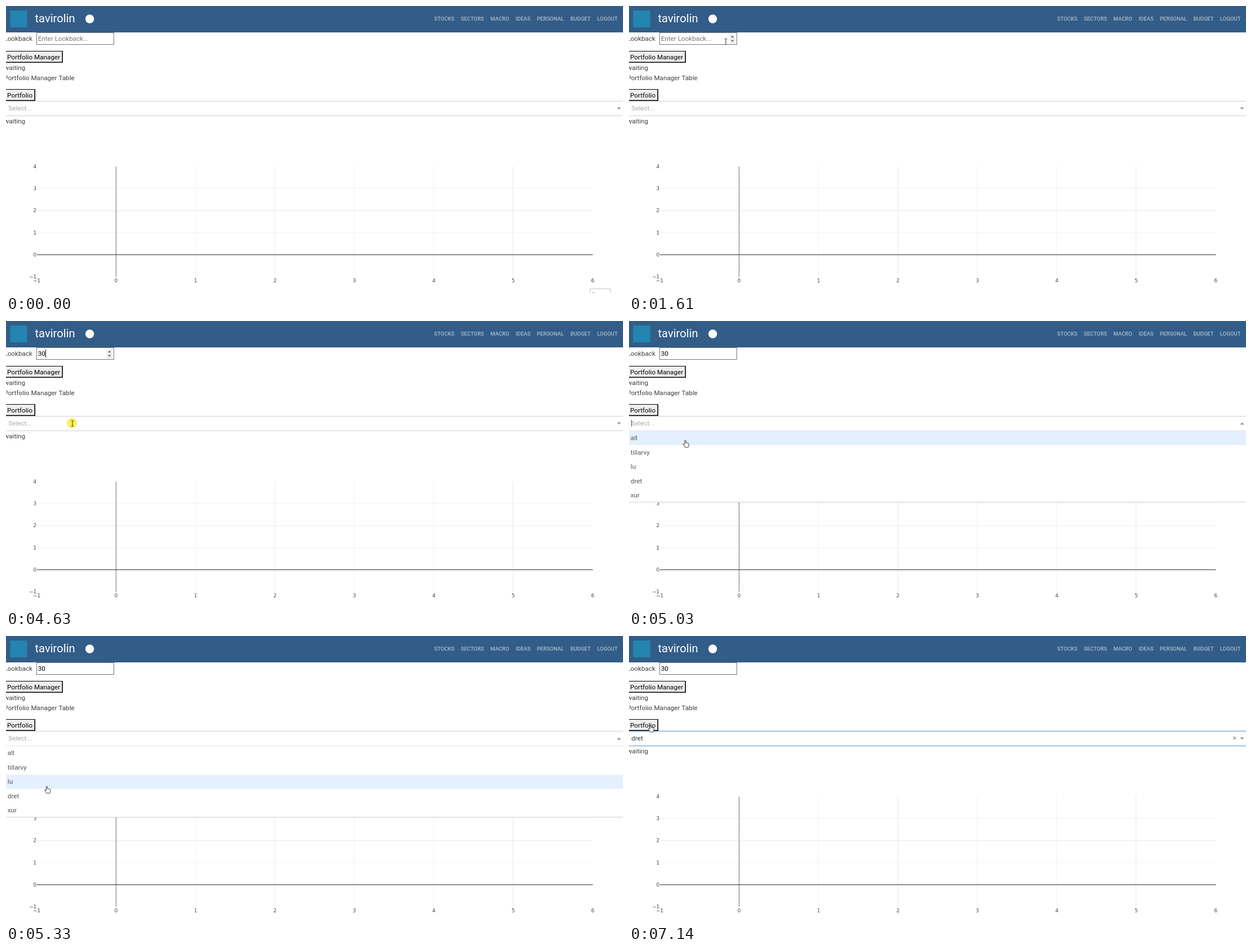
An HTML page with a canvas for the animation above (8 s loop, 1096x511 px).

```html
<!DOCTYPE html>
<html lang="en">
<head>
<meta charset="utf-8">
<title>Portfolio dashboard</title>
<style>
  html, body { margin: 0; width: 100%; height: 100%; overflow: hidden; background: #fff; }
  canvas { display: block; }
</style>
</head>
<body>
<canvas id="stage" width="1096" height="511"></canvas>
<script>
const ctx = document.getElementById('stage').getContext('2d');
const W = 1096, H = 511, LOOP = 8000;
const UI = 'Roboto, sans-serif';
const CHART = '"DejaVu Sans", Verdana, sans-serif';
const INK = '#3e3f3a';
const OPTIONS = ['all', 'tillarvy', 'lu', 'dret', 'xur'];
const ROW = 25.5, MENU_TOP = 195.5;

const T = {
  tip: 100, focus: 1710, key1: 3220, key2: 3330,
  open: 4730, pick: 5550, clear: 5750
};

// Pointer moves: start, end, steps, target x, target y
const MOVES = [
  [390, 390, 1, 880, 348],
  [490, 490, 1, 767, 348],
  [580, 680, 2, 605, 220],
  [880, 980, 2, 392, 129],
  [1090, 1610, 6, 172, 63],
  [2010, 2310, 4, 198, 103],
  [3930, 4330, 5, 128, 184],
  [4430, 4430, 1, 120, 190],
  [4530, 4530, 1, 118, 182],
  [5030, 5030, 1, 100, 212],
  [5130, 5130, 1, 75, 258],
  [5230, 5340, 2, 70, 276],
  [5850, 6250, 5, 43, 150],
  [6550, 6750, 3, 39, 158],
  [6940, 6940, 1, 38.5, 158],
  [7140, 7140, 1, 38, 158]
];
const CLICKS = [[1710, 1810], [4630, 4730], [5440, 5550]];

const within = (t, a, b) => t >= a && t < b;
const inBox = (p, x0, y0, x1, y1) => p.x >= x0 && p.x <= x1 && p.y >= y0 && p.y <= y1;
const easeOut = p => 1 - (1 - p) ** 2;

function rect(x, y, w, h, color) {
  ctx.fillStyle = color;
  ctx.fillRect(x, y, w, h);
}

function text(str, x, y, color = INK, font = '11.7px ' + UI, align = 'left') {
  ctx.font = font;
  ctx.fillStyle = color;
  ctx.textAlign = align;
  ctx.fillText(str, x, y);
}

function shape(points, color) {
  ctx.beginPath();
  points.forEach(([x, y]) => ctx.lineTo(x, y));
  ctx.closePath();
  ctx.fillStyle = color;
  ctx.fill();
}

function disc(x, y, r, color) {
  ctx.beginPath();
  ctx.arc(x, y, r, 0, Math.PI * 2);
  ctx.fillStyle = color;
  ctx.fill();
}

// Triangle pointing down (dir 1) or up (dir -1)
function wedge(x, y, r, dir, color) {
  const h = r * 0.55 * dir;
  shape([[x - r, y - h], [x + r, y - h], [x, y + h]], color);
}

function pointerAt(t) {
  if (t < MOVES[0][0]) return null;
  let p = { x: 960, y: 348 };
  for (const [t0, t1, n, x, y] of MOVES) {
    if (t < t0) break;
    const gap = n > 1 ? (t1 - t0) / (n - 1) : 1;
    const k = Math.min(n, Math.floor((t - t0) / gap + 0.01) + 1);
    const e = n > 4 ? easeOut(k / n) : k / n;
    p = { x: p.x + (x - p.x) * e, y: p.y + (y - p.y) * e };
  }
  return p;
}

const overInput = p => p && inBox(p, 54, 47, 192, 69);

function pointerKind(p, open) {
  if (open && p.y > MENU_TOP) return 'hand';
  if (overInput(p) || inBox(p, 0, 169, 1065, 195)) return 'beam';
  if (inBox(p, 0, 148, 52, 169) || inBox(p, 0, 80, 101, 101)) return 'hand';
  if (inBox(p, 55, 286, 1042, 482)) return 'cross';
  return 'arrow';
}

function outlined(path) {
  ctx.fillStyle = '#fff';
  ctx.strokeStyle = '#222';
  ctx.lineWidth = 0.9;
  ctx.lineJoin = 'round';
  const p = new Path2D(path);
  ctx.fill(p);
  ctx.stroke(p);
}

function drawPointer(p, kind) {
  ctx.save();
  ctx.translate(p.x, p.y);
  if (kind === 'arrow') {
    outlined('M.5 .5V9.6L2.6 7.7L4 11L5.5 10.4L4.1 7.2H7Z');
  } else if (kind === 'hand') {
    outlined('M-1 8V1Q0-.6 1 1V5Q2 4 3 5.3Q4 4.6 4.7 5.8Q5.8 5.2 6.2 6.6V9.5' +
      'Q6 11.5 5 13H-.2Q-1.5 11-3.8 8.2Q-4 6.6-2.6 7Z');
  } else if (kind === 'beam') {
    rect(-0.5, -4.5, 1, 10, '#333');
    rect(-2.5, -5, 5, 1, '#555');
    rect(-2.5, 5, 5, 1, '#555');
  } else {
    rect(-7, -0.5, 14, 1, '#333');
    rect(-0.5, -7, 1, 14, '#333');
  }
  ctx.restore();
}

function drawNav() {
  rect(0, 0, W, 47, '#325d88');
  rect(7.5, 8, 30, 30, '#2385b0');
  text('tavirolin', 51.5, 29, '#fff', '20.2px ' + UI);
  disc(148.7, 23, 7.7, '#fff');
  const links = { STOCKS: 760.5, SECTORS: 808, MACRO: 860.5, IDEAS: 905.3,
    PERSONAL: 943, BUDGET: 1002.5, LOGOUT: 1050 };
  for (const name in links) {
    text(name, links[name], 25.6, '#a9bacb', '500 9.5px ' + UI);
  }
}

function drawButton(label, y, right) {
  rect(-4, y, right + 4, 21, '#000');
  rect(-4, y + 1, right + 2.4, 18.5, '#efefef');
  text(label, 2, y + 14.6, '#000');
}

function drawInput(t, p) {
  text('Lookback', -3.6, 62);
  rect(54, 47, 138, 22, '#767676');
  rect(55, 48, 136, 20, '#fff');
  const typed = t < T.key1 ? '' : t < T.key2 ? '3' : '30';
  text(typed || 'Enter Lookback...', 56.7, 62, typed ? '#000' : '#757575');
  const focused = within(t, T.focus, T.open);
  if (focused || overInput(p)) {
    rect(178.5, 49.5, 10.5, 17.5, '#efefef');
    wedge(183.7, 54.3, 2.5, -1, '#444');
    wedge(183.7, 62, 2.5, 1, '#444');
  }
  const blink = within(t, 2210, 2800) || within(t, 3830, 4330);
  if (focused && !blink) {
    rect(57 + typed.length * 6.5, 51, 1, 14, '#000');
  }
}

function drawChart() {
  const gx = i => Math.round(195.6 + i * 141.1) - 0.5;
  const gy = i => 442.7 - i * 39.3;
  const font = '8.8px ' + CHART;
  const label = n => String(n).replace('-', '\u2212');
  for (let i = 1; i < 6; i++) {
    rect(Math.floor(gx(i)), 286, 1, 196, i === 2 || i === 5 ? '#e9e9e9' : '#f2f2f2');
  }
  for (let i = 1; i < 4; i++) {
    rect(55, Math.floor(gy(i)), 987, 1, i === 2 ? '#e9e9e9' : '#f2f2f2');
  }
  rect(195, 286, 1, 196, '#707070');
  rect(55, 442.2, 987.5, 1.2, '#444');
  for (let i = -1; i < 5; i++) text(label(i), 54.2, gy(i) + 3.3, '#444', font, 'right');
  for (let i = -1; i < 7; i++) text(label(i), 195.6 + i * 141.1, 492, '#444', font, 'center');
}

function drawToolbar(alpha) {
  ctx.save();
  ctx.globalAlpha = alpha;
  for (const x of [952, 973, 991, 1014, 1032, 1050, 1068]) {
    ctx.strokeStyle = '#444';
    ctx.lineWidth = 2;
    ctx.strokeRect(x - 3.5, 223, 7, 6);
  }
  rect(1085, 221, 11, 10, '#444');
  ctx.restore();
}

function drawSelect(t) {
  const open = within(t, T.open, T.pick), picked = t >= T.pick;
  if (picked) rect(0, 167, W, 31, '#e9f3fe');
  const edge = picked ? '#6ba0d4' : '#cfcfcf';
  rect(0, 169, W, 27, '#fff');
  rect(0, 169, W, 1, edge);
  rect(0, 195, W, 1, open ? '#e6e6e6' : edge);
  text(picked ? OPTIONS[3] : 'Select...', 4.3, 186.3, picked ? '#333' : '#aaa');
  wedge(1089, 182.6, 3.6, open ? -1 : 1, '#999');
  if (t >= T.clear) text('\u00d7', 1075.7, 186.4, '#888', '13px ' + UI, 'center');
  if (within(t, T.open, 5230)) rect(4, 176, 1, 12, '#555');
}

function drawMenu(t) {
  const active = t < 5130 ? 0 : t < 5230 ? 1 : t < 5340 ? 2 : 3;
  rect(0, 196, W, 127, '#fff');
  OPTIONS.forEach((name, i) => {
    const y = MENU_TOP + i * ROW;
    if (i === active) rect(0, Math.round(y), W, 25, '#e4f0fd');
    text(name, 2.8, y + 16.6, '#555');
  });
  rect(0, 322, W, 1, '#cfcfcf');
}

function toolbarAlpha(t) {
  if (within(t, 390, 880)) return t < 490 ? 0.1 : t < 580 ? 0.2 : 0.3;
  if (within(t, T.pick, 5850)) return t < 5650 ? 0.03 : t < T.clear ? 0.08 : 0.25;
  return 0;
}

function draw(t) {
  const p = pointerAt(t), open = within(t, T.open, T.pick);
  rect(0, 0, W, H, '#fff');
  drawNav();
  drawInput(t, p);
  drawButton('Portfolio Manager', 80, 101);
  text('waiting', -3.6, 114);
  text('Portfolio Manager Table', -3.6, 131.6);
  drawChart();
  drawToolbar(toolbarAlpha(t));
  drawSelect(t);
  drawButton('Portfolio', 148, 52);
  text('waiting', -3.6, 208.5);
  if (t < T.tip) {
    ctx.strokeStyle = '#c8c8c8';
    ctx.lineWidth = 1;
    ctx.strokeRect(1037.5, 503.5, 36, 20);
    text('Export', 1041, 517, '#777', '9.5px ' + UI);
  }
  if (open) drawMenu(t);
  if (!p) return;
  if (CLICKS.some(([a, b]) => within(t, a, b))) {
    disc(p.x - 1, p.y - 0.5, 9, 'rgba(250, 238, 60, 0.85)');
  }
  drawPointer(p, pointerKind(p, open));
}

function tick() {
  draw(performance.now() % LOOP);
  requestAnimationFrame(tick);
}
tick();
</script>
</body>
</html>
```
